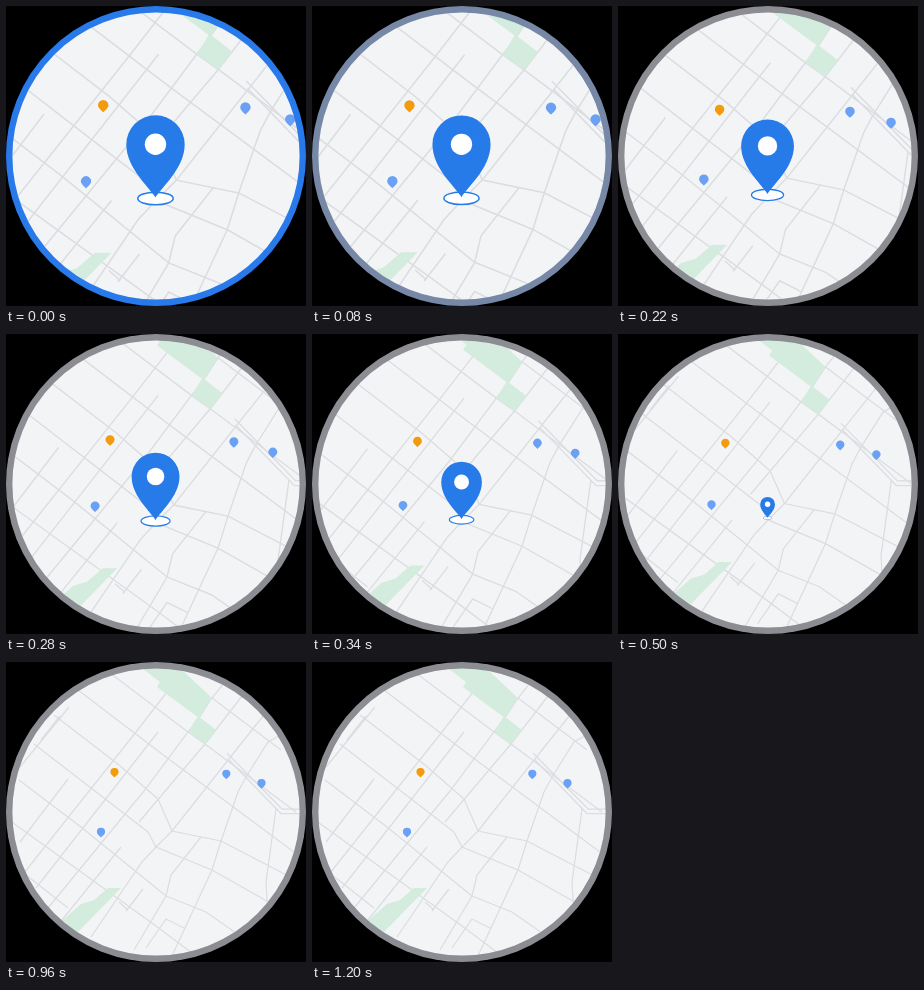
An HTML page that plays this animation: 300x300 px, repeating every 1.82 s.

```html
<!DOCTYPE html>
<html lang="en">
<head>
<meta charset="utf-8">
<title>Map zoom</title>
<style>
  html, body { margin: 0; height: 100%; overflow: hidden; background: #000; }
  svg { display: block; width: 100vw; height: 100vh; }
</style>
</head>
<body>
<svg viewBox="0 0 300 300">
  <defs>
    <clipPath id="disc"><circle cx="150" cy="150" r="147"/></clipPath>
    <path id="dot" d="M0 0C-1-1.200-4.100-3.200-4.100-5.500A4.100 4.100 0 0 1 4.100-5.500C4.100-3.200 1-1.200 0 0Z"/>
  </defs>
  <g clip-path="url(#disc)">
    <rect width="300" height="300" fill="#f3f4f6"/>
    <g id="map">
      <g fill="none" stroke="#dcdde1" stroke-width="1.25">
        <!-- streets running down to the right -->
        <path d="M100 8L182 70L199 82L290 150M72 28L160 95L300 199M48 53L113 103L152 137
          M28 82L142 170M13 118L75 165L160 234L200 250L240 278M3 158L150 264L190 294
          M10 205L62 246M206 36L275 88"/>
        <!-- streets running up to the right -->
        <path d="M14 105L63 45M14 180L62 117M35 78L54 54M18 211L130 70L175 12
          M30 226L152 70M42 246L138 129L182 70L193 56L206 36L222 16M56 258L115 185
          M85 275L136 200L150 185L166 169M133 160L199 82L236 34M166 169L230 88L258 53"/>
        <!-- larger roads -->
        <path d="M152 137L166 169L215 179L292 219M142 170L150 185L206 208L275 247
          M285 67L262 80L240 115L232 130L215 179L206 208L165 296
          M195 175L165 213L160 234L128 288
          M221 91L276 147H300M222 97L275 151.500H300M270 147L260 220L262 255
          M120 249L137 227M113 240L122 248M140 286L160 257L178 266"/>
      </g>
      <g fill="#d3ecdd">
        <path d="M120-6L176 8L206 36L193 56L151 25L154 20Z"/>
        <path d="M192 54L210 68L199 82L182 70Z"/>
        <path d="M50 264L75 242L88 238L102 226L115 226L72 270L60 280Z"/>
      </g>
      <g id="places"></g>
      <g id="marker">
        <ellipse cy=".5" rx="17.700" ry="6.300" fill="#fff" stroke="#267be9" stroke-width="1.500"/>
        <path d="M0-.5C-4-9-29.200-29-29.200-53.600A29.200 29.200 0 0 1 29.200-53.600C29.200-29 4-9 0-.5Z" fill="#267be9"/>
        <circle cy="-53.700" r="10.700" fill="#fff"/>
      </g>
    </g>
  </g>
  <circle id="rim" cx="150" cy="150" r="146.800" fill="none" stroke-width="6.400"/>
</svg>
<script>
const LOOP = 1820, END_SCALE = 0.786;
const $ = id => document.getElementById(id);
const clamp = x => Math.min(1, Math.max(0, x));

$('places').innerHTML = [
  [108.5, 115.6, '#f29b0d'], [220.3, 117.3, '#6ba1f5'],
  [255.5, 126.7, '#6ba1f5'], [95, 175.4, '#6ba1f5']
].map(([x, y, color]) =>
  `<use href="#dot" fill="${color}" transform="translate(${x} ${y})"/>`).join('');

// cubic-bezier(.4, 0, 0, 1)
function ease(x) {
  if (x <= 0 || x >= 1) return clamp(x);
  let lo = 0, hi = 1;
  for (let i = 0; i < 24; i++) {
    const u = (lo + hi) / 2;
    if (1.2 * (1 - u) ** 2 * u + u ** 3 < x) lo = u; else hi = u;
  }
  return lo * lo * (3 - 2 * lo);
}

function draw(t) {
  const zoom = (1 - (1 - END_SCALE) * ease(t / 900)) / END_SCALE;
  const size = (1 - ease((t - 150) / 1000)) * END_SCALE;
  $('map').setAttribute('transform', `translate(150 150) scale(${zoom}) translate(-150 -150)`);
  $('marker').setAttribute('transform', `translate(149.600 183) scale(${size})`);
  $('marker').setAttribute('visibility', size > 0.012 ? 'visible' : 'hidden');
  const fade = clamp(t / 103);
  const [from, to] = [[39, 122, 236], [140, 140, 147]];
  $('rim').setAttribute('stroke',
    `rgb(${from.map((c, i) => Math.round(c + (to[i] - c) * fade))})`);
}

const start = performance.now();
(function tick() {
  draw((performance.now() - start) % LOOP);
  requestAnimationFrame(tick);
})();
</script>
</body>
</html>
```
